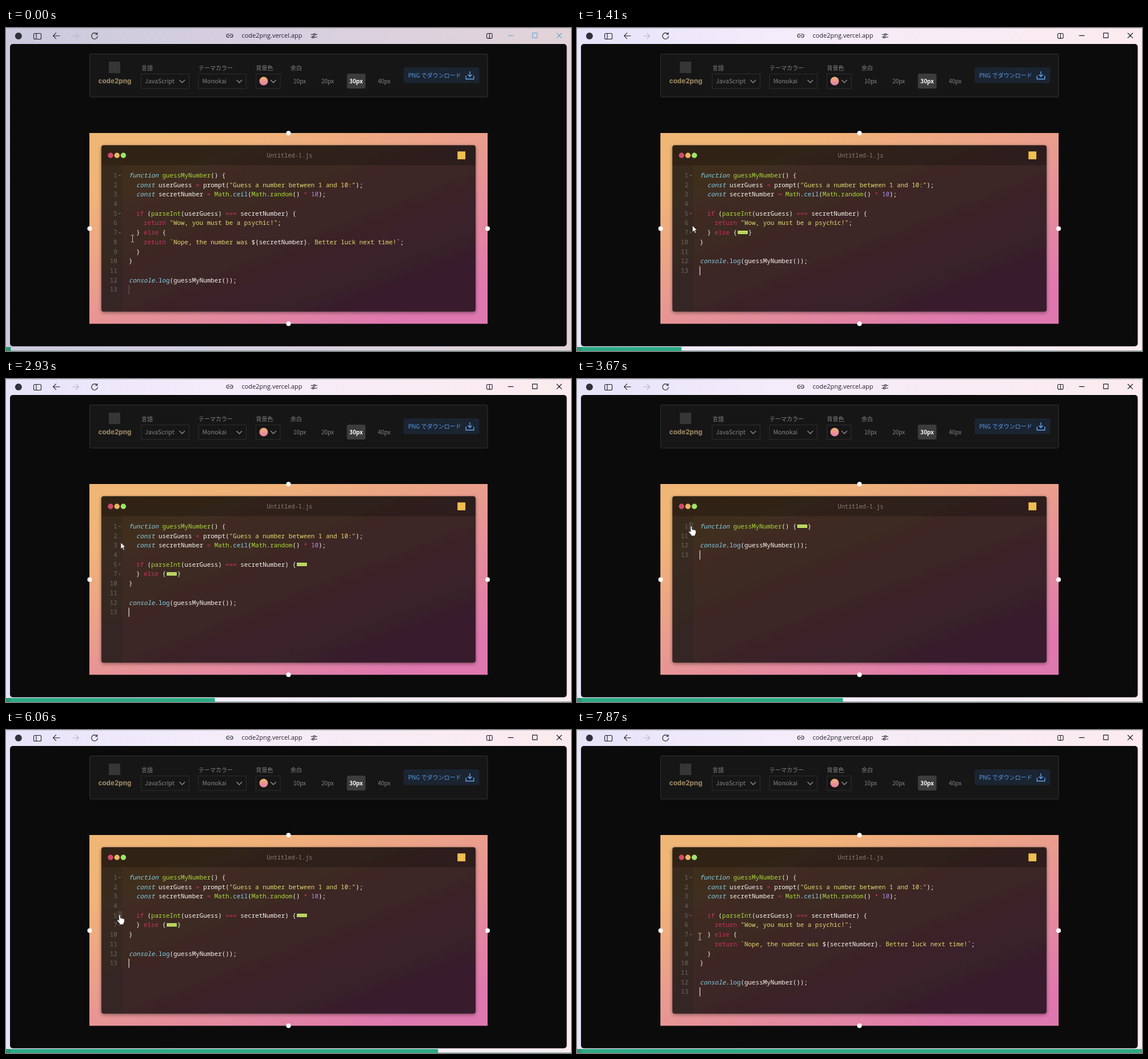
Recreate the animation shown at these times as an HTML page. Size 989 by 566 pixels, loop 7940 ms.

```html
<!DOCTYPE html>
<html lang="ja">
<head>
<meta charset="utf-8">
<title>Code folding</title>
<style>
html, body { margin: 0; width: 100%; height: 100%; overflow: hidden; background: #0b0b0b; }
svg { display: block; position: absolute; left: 0; top: 0; }
text { white-space: pre; }
.ui { font-family: "Noto Sans CJK JP", "Noto Sans CJK", "Noto Sans", sans-serif; font-size: 10px; fill: #858585; }
.mono { font-family: "Noto Sans Mono", "DejaVu Sans Mono", monospace; font-size: 10.85px; font-weight: 500; }
.line { fill: none; stroke: #20202a; stroke-width: 1.1; stroke-linecap: round; stroke-linejoin: round; }
.box { fill: none; stroke: #2e2e2e; }
.chev { fill: none; stroke: #909090; stroke-width: 1.3; }
#controls { stroke: #1d1a24; }
.idle #controls { stroke: #6da9d8; }
.idle #frame { fill: url(#frameIdle); }
.mid { text-anchor: middle; }
</style>
</head>
<body>
<svg id="stage" width="989" height="566" viewBox="0 0 989 566">
  <defs>
    <linearGradient id="frameOn">
      <stop offset="0" stop-color="#e6e3fa"/><stop offset=".35" stop-color="#f4ecfa"/><stop offset="1" stop-color="#fbebee"/>
    </linearGradient>
    <linearGradient id="frameIdle">
      <stop offset="0" stop-color="#cbcadd"/><stop offset=".5" stop-color="#d8d0e0"/><stop offset="1" stop-color="#e2d3d8"/>
    </linearGradient>
    <linearGradient id="sunset" gradientUnits="userSpaceOnUse" x1="400" y1="140" x2="560" y2="560">
      <stop offset="0" stop-color="#f0b676"/><stop offset=".15" stop-color="#f0b279"/><stop offset="1" stop-color="#df78b0"/>
    </linearGradient>
    <linearGradient id="dusk" gradientUnits="userSpaceOnUse" x1="420" y1="190" x2="550" y2="520">
      <stop offset="0" stop-color="#402e1f"/><stop offset="1" stop-color="#381e2d"/>
    </linearGradient>
    <linearGradient id="swatch" x2="0" y2="1">
      <stop offset="0" stop-color="#f0b274"/><stop offset="1" stop-color="#e57cab"/>
    </linearGradient>
    <filter id="shadow" x="-5%" y="-8%" width="110%" height="118%">
      <feDropShadow dx="0" dy="2" stdDeviation="3" flood-opacity=".4"/>
    </filter>
  </defs>

  <rect id="frame" width="989" height="566" fill="url(#frameOn)"/>
  <path d="M0 565.5H989" stroke="#86a9a8"/>
  <path d="M0 .5H989" stroke="#aaa6b8" opacity=".5"/>
  <rect x="7" y="28" width="974.5" height="529.7" rx="5" fill="#0b0b0b"/>

  <!-- browser bar -->
  <circle cx="21.8" cy="14" r="6" fill="#30303a"/>
  <g class="line">
    <rect x="48.5" y="9.5" width="13" height="10" rx="2"/><path d="M53 9.5v10"/>
    <path d="M94 13.7H82.5M87.5 8.7l-5 5 5 5"/>
    <path d="M116.5 13.7H127M122.5 8.9l4.8 4.8-4.8 4.8" stroke="#b9b4c4"/>
    <path d="M159.2 10.7a5.3 5.3 0 1 0 1.1 3.6M159.8 8v3.2h-3.2"/>
    <path d="M390.5 10.7h-1.6a2.8 2.8 0 0 0 0 5.6h1.6M392.7 10.7h1.6a2.8 2.8 0 0 1 0 5.6h-1.6M389.2 13.5h4.8"/>
    <path d="M534 11.3h4M541.5 11.3h3M534 16h2M539.5 16h5"/>
    <circle cx="539.8" cy="11.3" r="1.6"/><circle cx="537.7" cy="16" r="1.6"/>
    <rect x="841.5" y="9.5" width="9.6" height="8.6" rx="1.5"/><path d="M846.3 9.5v8.6"/>
    <path id="controls" d="M879.3 13.4h8.6M921.6 8.9h8.2v8.2h-8.2zM964.2 9l8.4 8.4M972.6 9l-8.4 8.4"/>
  </g>
  <text x="465.5" y="17" class="mid" font-family="'Open Sans', 'Noto Sans', sans-serif" font-size="11" fill="#25222d">code2png.vercel.app</text>

  <!-- toolbar -->
  <rect x="146.5" y="45.5" width="696.5" height="75.5" rx="2" fill="#161616" stroke="#343434"/>
  <rect x="180" y="59" width="20" height="20" fill="#363636"/>
  <text x="190.5" y="97.3" class="mid" font-family="Inter, sans-serif" font-size="11.6" font-weight="800" fill="#94805f">code2png</text>
  <g class="ui">
    <text x="237" y="73.6">言語</text><text x="337" y="73.6">テーマカラー</text>
    <text x="437.5" y="73.6">背景色</text><text x="498" y="73.6">余白</text>
    <text x="243" y="97.3" font-size="10.6">JavaScript</text><text x="343.5" y="97.3" font-size="10.6">Monokai</text>
    <rect x="596.7" y="80" width="32.6" height="26" rx="3" fill="#3c3c3c"/>
    <g class="mid">
      <text x="514" y="97">10px</text><text x="563" y="97">20px</text>
      <text x="612.8" y="97" fill="#fff" font-weight="700">30px</text><text x="662" y="97">40px</text>
    </g>
    <rect x="696" y="69" width="132.5" height="27.5" rx="3" fill="#1b2431"/>
    <text x="704" y="86.6" fill="#5c9de6">PNG でダウンロード</text>
  </g>
  <path d="M812 76v9M808.3 81.5l3.7 3.7 3.7-3.7M805.2 83.5v6h13.6v-6" fill="none" stroke="#62a5f0" stroke-width="1.4"/>
  <path class="box" d="M236.5 80.5h84v25.5h-84zM337 80.5h83.5v25.5H337zM437.5 80.5h42.5v25.5h-42.5z"/>
  <path class="chev" d="M303.5 91l4.8 4.8 4.8-4.8M403.5 91l4.8 4.8 4.8-4.8M463.2 91l4.8 4.8 4.8-4.8"/>
  <circle cx="451" cy="93" r="7.5" fill="url(#swatch)"/>

  <!-- editor -->
  <rect x="146" y="184" width="697" height="334.3" fill="url(#sunset)"/>
  <g fill="#fff">
    <circle cx="494.5" cy="184.2" r="4"/><circle cx="494.5" cy="518.3" r="4"/>
    <circle cx="146.4" cy="351.5" r="4"/><circle cx="843" cy="351.5" r="4"/>
  </g>
  <rect x="167" y="205.5" width="655" height="291.5" rx="4" fill="url(#dusk)" filter="url(#shadow)"/>
  <path d="M167 240.5V209.5a4 4 0 0 1 4-4H818a4 4 0 0 1 4 4V240.5z" opacity=".25"/>
  <path d="M167 240.5H204V497H171a4 4 0 0 1-4-4z" fill="#272822" opacity=".32"/>
  <rect x="167" y="205.5" width="655" height="291.5" rx="4" fill="none" stroke="#5b4638" stroke-opacity=".5"/>
  <circle cx="183" cy="223.3" r="4.7" fill="#d04c69"/>
  <circle cx="194.2" cy="223.3" r="4.7" fill="#eeb564"/>
  <circle cx="205.4" cy="223.3" r="4.7" fill="#9fe36c"/>
  <text x="496.5" y="227" class="mono mid" style="font-size:10.25px;font-weight:400" fill="#8b7e76">Untitled-1.js</text>
  <rect x="790.3" y="216.3" width="13.8" height="13.8" fill="#efbf50"/>

  <rect id="hover" x="196" width="7.5" height="15" fill="#fff" opacity=".1"/>
  <g id="code" class="mono"></g>
  <rect id="caret" x="214.6" width="1.1" height="16"/>

  <rect id="bar" y="559" height="7" fill="#2eaa85"/>
  <rect y="559" width="8" height="7" fill="#2b9571"/>

  <g id="pointer">
    <circle id="press" r="11" fill="#c4ae12" opacity=".88"/>
    <path id="hand" d="M-1.4 1.2c0-1.8 2.8-1.8 2.8 0V5.8l1.2-.5 1.2.9 1.3-.4 1.1 1 1.3 0 .9 1.1v4.2l-1.6 3V17H-.1v-1.7L-4.2 10.6c-1-1.5.6-2.6 1.7-1.6l1.1 1z" fill="#fff" stroke="#1c1815" stroke-width=".8"/>
    <path id="arrow" d="M0 0V11.6l2.7-2.5 1.9 4.4 2-.9-1.9-4.2H8.4z" fill="#fff" stroke="#1c1815" stroke-width=".8"/>
    <path id="beam" d="M-2.6-6H-.6L0-5.4.6-6H2.6M0-5.4V5.4M-2.6 6H-.6L0 5.4.6 6H2.6" fill="none" stroke="#c9c2bc"/>
  </g>
</svg>
<script>
const LOOP = 7940, FRAMES = 119, STEP = LOOP / FRAMES;
const ROW = 16.72, TOP = 258, LEFT = 215, CHAR = 6.51;
const FOCUS = 880;

const colors = {
  i: '#86d3e8', c: '#86d3e8', g: '#a9d93a', w: '#f5f3ee',
  p: '#d0305f', y: '#e3d873', v: '#a98ae6'
};
const source = [
  '~ifunction~w ~gguessMyNumber~w() {',
  '  ~iconst~w userGuess ~p=~w prompt(~y"Guess a number between 1 and 10:"~w);',
  '  ~iconst~w secretNumber ~p=~w ~gMath~w.~cceil~w(~gMath~w.~grandom~w() ~p*~w ~v10~w);',
  '',
  '  ~pif~w (~gparseInt~w(userGuess) ~p===~w secretNumber) {',
  '    ~preturn~w ~y"Wow, you must be a psychic!"~w;',
  '  } ~pelse~w {',
  '    ~preturn~w ~y`Nope, the number was ~w${secretNumber}~y. Better luck next time!`~w;',
  '  }',
  '}',
  '',
  '~iconsole~w.~clog~w(guessMyNumber());',
  ''
];

// Foldable lines: last hidden line, closing text, folded span in ms
const folds = {
  1: { last: 10, tail: '}', from: 3530, to: 4220 },
  5: { last: 6, tail: '', from: 2270, to: 6270 },
  7: { last: 9, tail: '}', from: 960, to: 7600 }
};
const clicks = Object.values(folds).flatMap(f => [f.from, f.to]).sort((a, b) => a - b);
const PRESS = 140;

// Pointer path: time, x, y
const path = [
  [0, 221.5, 369], [250, 219, 367], [620, 200, 356], [1130, 200, 356],
  [1410, 202, 346], [1850, 202, 324.5], [2480, 202, 324.5],
  [3200, 200, 256.5], [3530, 200, 258], [4300, 199, 258.5],
  [4610, 198.5, 263.5], [5400, 199, 322], [6060, 199, 324],
  [6600, 199.5, 324], [7200, 200, 355.5], [7640, 200, 355.5], [7870, 215, 362]
];

const $ = id => document.getElementById(id);
const show = (el, on) => el.setAttribute('display', on ? 'inline' : 'none');
function add(parent, tag, attrs, text) {
  const el = document.createElementNS('http://www.w3.org/2000/svg', tag);
  for (const k in attrs) el.setAttribute(k, attrs[k]);
  if (text) el.textContent = text;
  parent.append(el);
  return el;
}

const rows = source.map((src, k) => {
  const n = k + 1, fold = folds[n];
  const g = add($('code'), 'g', {});
  add(g, 'text', { x: 194.8, y: 3.8, 'text-anchor': 'end', fill: '#70655a', 'font-weight': 400 }, String(n));
  const text = add(g, 'text', { x: LEFT, y: 3.8 });
  (src[0] === '~' ? src.slice(1) : 'w' + src).split('~').forEach(part => {
    const attrs = { fill: colors[part[0]] };
    if (part[0] === 'i') attrs['font-style'] = 'italic';
    add(text, 'tspan', attrs, part.slice(1));
  });
  const row = { n, g, fold };
  if (fold) {
    const x = LEFT + text.textContent.length * CHAR;
    const arrow = { fill: 'none', stroke: '#8b7f72', 'stroke-width': 1 };
    row.open = add(g, 'path', { ...arrow, d: 'M197.3-.8l1.8 1.8 1.8-1.8' });
    row.shut = add(g, 'g', {});
    add(row.shut, 'path', { ...arrow, d: 'M198.2-1.8l1.7 1.8-1.7 1.8' });
    add(row.shut, 'rect', { x: x + .8, y: -3.6, width: 18.4, height: 7, fill: '#c5df69', stroke: '#211a12', 'stroke-width': .8 });
    add(row.shut, 'path', { d: `M${x + 4} 0h3m1.5 0h3m1.5 0h3`, stroke: '#8d9c43', 'stroke-width': .9 });
    add(row.shut, 'text', { x: x + 3 * CHAR, y: 3.8, fill: colors.w }, fold.tail);
  }
  return row;
});

function pointerAt(t) {
  const k = path.findIndex(p => p[0] > t);
  if (k < 0) return path[path.length - 1].slice(1);
  const [t0, x0, y0] = path[k - 1], [t1, x1, y1] = path[k];
  const u = (t - t0) / (t1 - t0), e = u * u * (3 - 2 * u);
  return [x0 + (x1 - x0) * e, y0 + (y1 - y0) * e];
}

function draw(now) {
  const frame = Math.floor((now % LOOP + 3.4) / STEP) % FRAMES;
  const t = frame * STEP;
  const isShut = f => t >= f.from && t < f.to;
  const shut = rows.filter(r => r.fold && isShut(r.fold));

  const visible = rows.filter(r => {
    const on = !shut.some(s => r.n > s.n && r.n <= s.fold.last);
    show(r.g, on);
    return on;
  });
  visible.forEach((r, k) => {
    r.g.setAttribute('transform', `translate(0 ${TOP + k * ROW})`);
    if (r.fold) {
      show(r.open, !isShut(r.fold));
      show(r.shut, isShut(r.fold));
    }
  });

  // The caret restarts its blink after every fold
  const focused = t >= FOCUS;
  const since = t - Math.max(FOCUS, ...clicks.filter(c => c <= t));
  $('stage').classList.toggle('idle', !focused);
  $('caret').setAttribute('y', TOP + (visible.length - 1) * ROW - 7.8);
  $('caret').setAttribute('fill', focused ? '#f5f3ee' : '#6b5c58');
  show($('caret'), !focused || since % 1200 < 600);

  const [x, y] = pointerAt(t);
  const under = Math.floor((y - TOP) / ROW + .5);
  const inText = x > 205;
  const onFold = !inText && visible[under] && visible[under].fold;
  $('pointer').setAttribute('transform', `translate(${x} ${y})`);
  show($('beam'), inText);
  show($('hand'), onFold);
  show($('arrow'), !inText && !onFold);
  show($('press'), clicks.some(c => t >= c - PRESS && t < c));
  show($('hover'), onFold);
  $('hover').setAttribute('y', TOP + under * ROW - 7.5);

  $('bar').setAttribute('width', (frame + 1) * 989 / FRAMES);
}

const start = performance.now();
function tick() {
  draw(performance.now() - start);
  requestAnimationFrame(tick);
}
draw(0);
requestAnimationFrame(tick);
</script>
</body>
</html>
```
